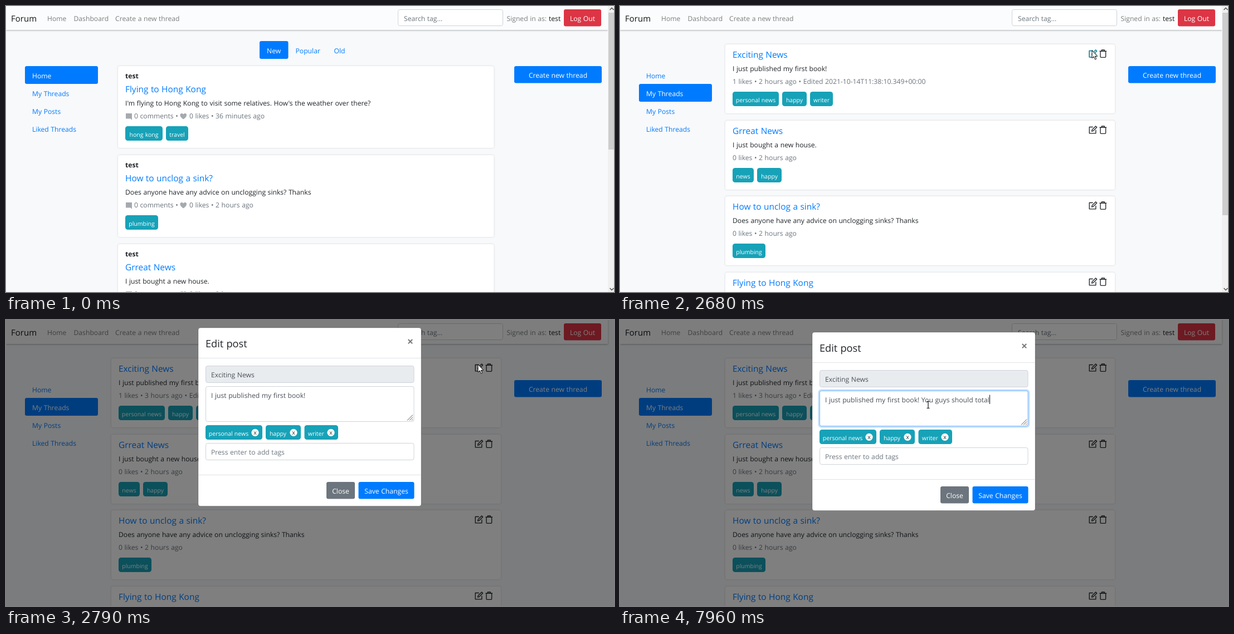
Recreate the animation shown at these times as an HTML page. Size 1091 px wide and 514 px high, loop 8000 ms.

```html
<!DOCTYPE html>
<html lang="en">
<head>
<meta charset="utf-8">
<title>Forum</title>
<style>
html, body { margin: 0; width: 100%; height: 100%; overflow: hidden; background: #f8f9fb; }
svg { display: block; width: 100vw; height: 100vh; }
text {
  font-family: "Open Sans", "Noto Sans", sans-serif; font-size: 12.17px; word-spacing: .4px;
  white-space: pre; fill: #212529; font-variant-ligatures: none; text-rendering: geometricPrecision;
}
.mid { text-anchor: middle; }
.white { fill: #fff; }
.blue { fill: #007bff; }
.gray { fill: #6c757d; }
.field { fill: #495057; }
.link { fill: #7d7e7f; }
.ink { fill: #16181a; }
.brand { font-size: 15px; fill: #16181a; }
.bold { font-weight: 700; }
.title { font-size: 15.45px; fill: #007bff; }
.heading { font-size: 18.2px; }
.tag { font-size: 10.5px; fill: #fff; text-anchor: middle; }
.tiny { font-size: 8.9px; fill: #fff; word-spacing: 0; }
.card { fill: #fff; filter: drop-shadow(0 0 1.6px rgba(0,0,0,.16)); }
.bar { fill: #fbfcfd; filter: drop-shadow(0 1px 1.5px rgba(0,0,0,.3)); }
.input { fill: #fff; stroke: #ced4da; }
.line { fill: none; stroke: #212529; stroke-width: 1.35; stroke-linejoin: round; }
.hot .line { stroke: #17a2b8; }
.shape { fill: #fff; stroke: #000; stroke-width: .9; stroke-linejoin: round; }

.home, .empty, .mine, .status, .early, .late, .hot, .focus, .arrow, .hand, .beam {
  animation: 8s step-end infinite;
}
.home { animation-name: home; }
.empty { animation-name: empty; }
.mine { animation-name: mine; }
.status { animation-name: status; }
.early { animation-name: early; }
.late { animation-name: late; }
.hot { animation-name: hot; }
.focus { animation-name: focus; }
.arrow { animation-name: arrow; }
.hand { animation-name: hand; }
.beam { animation-name: beam; }
.shade { animation: shade 8s step-end infinite; }
.modal { animation: modal 8s step-end infinite; }
.mouse { animation: mouse 8s linear infinite; }

@keyframes home { 0% { visibility: visible } 9.25%, 100% { visibility: hidden } }
@keyframes empty { 0% { visibility: hidden } 9.25% { visibility: visible } 11.25%, 100% { visibility: hidden } }
@keyframes mine { 0% { opacity: 0 } 11.25%, 100% { opacity: 1 } }
@keyframes status { 0% { visibility: hidden } 7.5% { visibility: visible } 11.25%, 100% { visibility: hidden } }
@keyframes early { 0% { visibility: visible } 34%, 100% { visibility: hidden } }
@keyframes late { 0% { visibility: hidden } 34%, 100% { visibility: visible } }
@keyframes hot { 0% { visibility: hidden } 29% { visibility: visible } 34%, 100% { visibility: hidden } }
@keyframes focus { 0% { visibility: hidden } 42.125%, 100% { visibility: visible } }
@keyframes arrow {
  0% { visibility: hidden } 1.5% { visibility: visible } 7.1% { visibility: hidden }
  15.7% { visibility: visible } 40.6%, 100% { visibility: hidden }
}
@keyframes hand { 0% { visibility: hidden } 7.1% { visibility: visible } 15.7%, 100% { visibility: hidden } }
@keyframes beam { 0% { visibility: hidden } 40.6%, 100% { visibility: visible } }
@keyframes shade { 0% { opacity: 0 } 34% { opacity: .15 } 34.5% { opacity: .37 } 34.875%, 100% { opacity: .5 } }
@keyframes modal {
  0% { opacity: 0; transform: translateY(-40px) }
  34% { opacity: .3; transform: translateY(-31px) }
  34.5% { opacity: .75; transform: translateY(-18px) }
  34.875% { opacity: 1; transform: translateY(-8px) }
  35.25% { opacity: 1; transform: translateY(-3px) }
  35.625%, 100% { opacity: 1; transform: none }
}
@keyframes mouse {
  0%, 1.5% { transform: translate(1085px, 420px); animation-timing-function: ease-in-out }
  7.5%, 15.25% { transform: translate(109.5px, 156px); animation-timing-function: ease-in-out }
  16.75%, 22.375% { transform: translate(317px, 222px); animation-timing-function: ease-in-out }
  29.375%, 37.5% { transform: translate(847px, 80px); animation-timing-function: ease-in-out }
  42.125%, 100% { transform: translate(553px, 152px) }
}
</style>
</head>
<body>
<svg id="stage" viewBox="0 0 1091 514" preserveAspectRatio="none"></svg>
<script>
const text = (x, y, cls, str) => `<text x="${x}" y="${y}" class="${cls}">${str}</text>`;
const box = (x, y, w, h, fill, r = 3.2) =>
  `<rect x="${x}" y="${y}" width="${w}" height="${h}" rx="${r}" fill="${fill}"/>`;
const input = (x, y, w, h, extra = '') =>
  `<rect class="input" x="${x}" y="${y}" width="${w}" height="${h}" rx="3.2" ${extra}/>`;
const card = (x, y, w, h) => `<rect class="card" x="${x}" y="${y}" width="${w}" height="${h}" rx="3.5"/>`;
const group = (cls, body, dx = 0, dy = 0) =>
  `<g class="${cls}"><g transform="translate(${dx} ${dy})">${body}</g></g>`;
const button = (x, y, w, fill, str) =>
  box(x, y, w, 30.4, fill) + text(x + w / 2, y + 21, 'mid white', str);

const TEAL = '#17a2b8', BLUE = '#007bff';
const tag = (x, y, w, str) => box(x, y, w, 26, TEAL, 4.5) + text(x + w / 2, y + 19, 'tag', str);
const tags = (x, y, list) => list.map(([str, w]) => {
  const out = tag(x, y, w, str);
  x += w + 6;
  return out;
}).join('');

const pencil = '<path class="line" d="M848.7 80.5h-6.5v11.3h11.6v-6M846.5 88.2l.8-3 6.3-6.2 2 2-6.3 6.3z"/>';
const bin = '<path class="line" d="M860.5 81.2h12.5M864.3 81v-2h5v2M862 81.4v9.6q0 1.3 1.3 1.3h7q1.3 0 1.3-1.3v-9.6"/>';
const comment = '<path fill="#a5aaaf" d="M215 193h11v12l-2.4-2.4H215z"/>';
const heart = '<path fill="#a5aaaf" d="M318.3 203.5c-8.5-5.5-6-10.5-3-10.5 1.7 0 2.5 1 3 1.8.5-.8 1.3-1.8 3-1.8 3 0 5.5 5-3 10.5z"/>';

function shell(active, wide) {
  const side = ['Home', 'My Threads', 'My Posts', 'Liked Threads'].map((str, i) =>
    (i === active ? box(34, 108 + 32 * i, wide ? 133 : 131, 32, BLUE) : '') +
    text(47, 130 + 32 * i, i === active ? 'white' : 'blue', str)).join('');
  return `<rect class="bar" x="0" y="-6" width="${wide ? 1091 : 1080}" height="49"/>` +
    text(9, 28, 'brand', 'Forum') + text(74, 27, 'link', 'Home') +
    text(121.5, 27, 'link', 'Dashboard') + text(196, 27, 'link', 'Create a new thread') +
    group('', input(703.5, 6.5, 188, 29) + text(714, 27, 'gray', 'Search tag...') +
      text(898.5, 27, 'link', 'Signed in as:') + text(974, 27, 'ink', 'test') +
      button(1001, 6, 67, '#dc3545', 'Log Out'), wide ? 13.5 : 0) +
    side + button(wide ? 923 : 912, 108, wide ? 159 : 157, BLUE, 'Create new thread');
}

const scrollbar = end => box(1080, 0, 11, 514, '#f0f0f0', 0) + box(1081, 12, 10, end - 12, '#cdcdcd', 0) +
  '<path d="M1083.5 7l3.5-3.5 3.5 3.5M1083.5 507l3.5 3.5 3.5-3.5" fill="none" stroke="#606060" stroke-width="1.6"/>';

const post = (i, title, body, age, list) => group('',
  card(201, 108, 674.5, 147) + text(214, 130, 'bold', 'test') + text(214, 155, 'title', title) +
  text(214, 179, '', body) + comment + heart + text(230, 202, 'gray', '0 comments •') +
  text(329, 202, 'gray', `0 likes • ${age}`) + tags(214, 216, list), 0, 160 * i);

const own = (i, title, body, meta, list) => group('',
  card(189, 69, 699, 124) + text(202, 93, 'title', title) + text(202, 117, '', body) +
  meta + pencil + bin + tags(202, 154, list), 0, Math.round(136.7 * i));
const meta = str => text(202, 140, 'gray', str);
const edited = n => meta(`1 likes • ${n} hours ago • Edited 2021-10-14T11:38:10.349+00:00`);

const texts = {
  trip: ['Flying to Hong Kong', "I'm flying to Hong Kong to visit some relatives. How's the weather over there?"],
  sink: ['How to unclog a sink?', 'Does anyone have any advice on unclogging sinks? Thanks'],
  house: ['Grreat News', 'I just bought a new house.'],
  book: ['Exciting News', 'I just published my first book!']
};
const plumbing = [['plumbing', 59]], travel = [['hong kong', 67], ['travel', 40]];
const news = [['news', 38], ['happy', 44]];

const home = shell(0) + box(455, 63, 51.5, 32, BLUE) + text(468, 85, 'white', 'New') +
  text(519.5, 85, 'blue', 'Popular') + text(588.5, 85, 'blue', 'Old') +
  post(0, ...texts.trip, '36 minutes ago', travel) +
  post(1, ...texts.sink, '2 hours ago', plumbing) +
  post(2, ...texts.house, '2 hours ago', news) + scrollbar(258);

const empty = shell(1, true) + text(191.5, 72, '', 'No threads submitted yet.') +
  box(0, 467, 1091, 47, '#f5f5f5', 0) + text(509, 497, 'gray', '© 2021') +
  '<circle cx="567" cy="492" r="11.3" fill="#24292e"/>';

const status = box(-3, 499.5, 196, 18, '#5c5c5c', 1) + text(-1, 511, 'tiny', 'devserver:4100/board-sample-ui/workspace#');

const mine = shell(1) +
  own(0, ...texts.book, group('early', edited(2)) + group('late', edited(3)),
    [['personal news', 83], ['happy', 44], ['writer', 41]]) +
  own(1, ...texts.house, meta('0 likes • 2 hours ago'), news) +
  own(2, ...texts.sink, meta('0 likes • 2 hours ago'), plumbing) +
  own(3, ...texts.trip, meta('0 likes • 1 hours ago'), travel) +
  group('hot', pencil) + group('early', scrollbar(376));

const chip = (x, w, str) => box(x, 197, w, 26, TEAL, 4.5) +
  text(x + (w - 19) / 2, 216, 'tag', str) +
  `<circle cx="${x + w - 13}" cy="210.3" r="6.6" fill="#fff"/>` +
  `<text x="${x + w - 13}" y="214" class="tag" style="fill:#333">x</text>`;

const modal = '<rect x="345" y="22" width="400" height="320.5" rx="4" fill="#fff" stroke="rgba(0,0,0,.2)"/>' +
  text(358, 57, 'heading', 'Edit post') +
  '<path d="M721.8 43l7.4 7.4M729.2 43l-7.4 7.4" stroke="#777" stroke-width="2"/>' +
  '<path d="M345 76.5h400M345 286.5h400" stroke="#dee2e6"/>' +
  input(358.5, 90.5, 373.5, 30, 'style="fill:#e9ecef"') + text(368, 111, 'field', 'Exciting News') +
  input(358.5, 127.5, 373.5, 63) +
  group('focus', '<rect x="356.8" y="126" width="377" height="66" rx="4.5" fill="none" stroke="#007bff" stroke-opacity=".25" stroke-width="2.8"/>' +
    input(358.5, 127.5, 373.5, 63, 'style="stroke:#80bdff"')) +
  '<path d="M720 188.5l10-10M724 188.5l6-6M728 188.5l2-2" stroke="#555"/>' +
  '<text id="words" class="field" x="368" y="148"></text>' +
  '<rect id="caret" y="134.5" width="1" height="16.5" fill="#111"/>' +
  chip(358, 102, 'personal news') + chip(466, 63, 'happy') + chip(535.5, 60.5, 'writer') +
  input(358.5, 229.5, 373.5, 30) + text(368, 250, 'gray', 'Press enter to add tags') +
  button(575, 299, 51, '#6c757d', 'Close') + button(632.5, 299, 100, BLUE, 'Save Changes');

const mouse =
  '<path class="shape arrow" d="M0 0V13.8l3.2-3 2.3 5.4 2.2-1-2.3-5h4.4z"/>' +
  '<path class="shape hand" d="M-1.5 10V1.3a1.5 1.5 0 0 1 3 0V6.3a1.4 1.4 0 0 1 2.5.5 1.4 1.4 0 0 1 2.4.6 1.2 1.2 0 0 1 1.8 1V12.5c0 2.5-1 3.5-1.3 6H.3c-.5-2.2-2.4-3.6-4.3-6.3-1-1.6.8-2.8 2.5-.8zM1.5 6v4M4 7v3M6.4 7.5v2.5"/>' +
  '<path class="beam" d="M-2.5-5.5h2l.5.5.5-.5h2M0-5V6M-2.5 6.5h2L0 6l.5.5h2" fill="none" stroke="#111" stroke-width="1.2"/>';

document.getElementById('stage').innerHTML =
  box(0, 0, 1091, 514, '#f8f9fb', 0) + group('home', home) + group('empty', empty) +
  group('mine', mine) + group('status', status) +
  '<rect class="shade" width="1091" height="514"/>' +
  group('modal', modal) + `<g class="mouse">${mouse}</g>`;

// Typing: [ms, letters typed]; a repeated count toggles the caret instead.
const typed = ' You guys should total';
const beats = [
  [3370, 0], [3570, 0], [3830, 0], [4100, 0], [4120, 1], [4360, 1], [4600, 1], [4800, 2], [4970, 3],
  [5130, 3], [5370, 3], [5420, 4], [5460, 5], [5660, 5], [5690, 6], [5900, 6], [5960, 7], [6030, 8],
  [6130, 9], [6240, 10], [6480, 10], [6600, 11], [6680, 12], [6770, 13], [6930, 13], [7000, 14],
  [7140, 16], [7300, 16], [7400, 17], [7570, 17], [7640, 18], [7720, 19], [7800, 20], [7880, 21], [7960, 22]
];
const words = document.getElementById('words'), caret = document.getElementById('caret');
let start;

function draw(now) {
  start ??= now;
  const t = (now - start) % 8000;
  let count = -1, on = false;
  for (const [ms, n] of beats) {
    if (ms > t) break;
    on = n !== count || !on;
    count = n;
  }
  const str = texts.book[1] + typed.slice(0, Math.max(count, 0));
  if (words.textContent !== str) words.textContent = str;
  caret.setAttribute('x', Math.round(368 + words.getComputedTextLength()));
  caret.setAttribute('opacity', on ? 1 : 0);
  requestAnimationFrame(draw);
}
requestAnimationFrame(draw);
</script>
</body>
</html>
```
